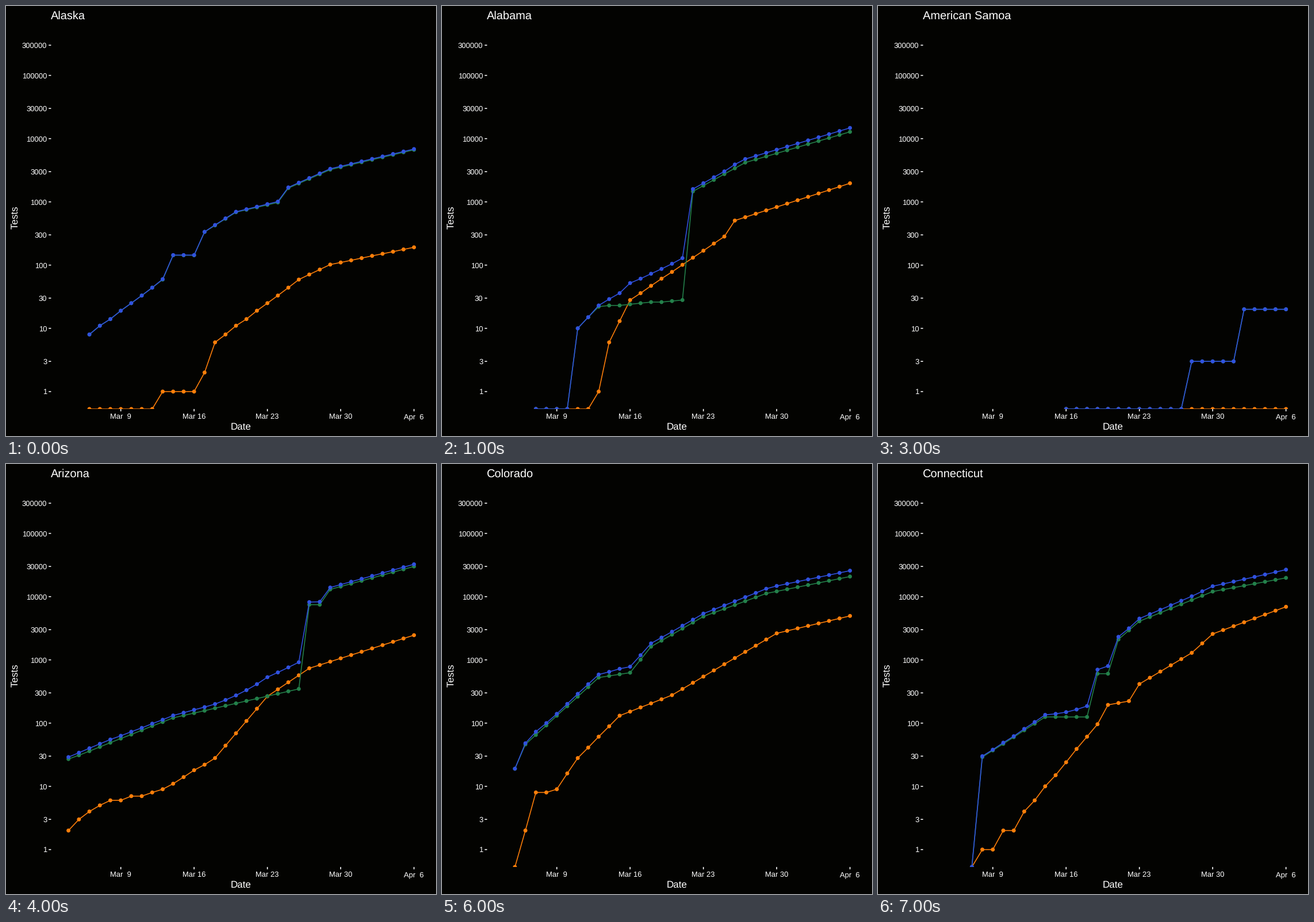
These frames come from a looping animation (748 px wide and 748 px high, 8 s). A matplotlib script:

```python
import numpy as np
import matplotlib.pyplot as plt
from matplotlib.animation import FuncAnimation
from matplotlib.patches import Rectangle

SIZE, DPI = 748, 100
PT = 72 / DPI                       # points per pixel
LEFT, RIGHT, TOP, BOTTOM = 78.4, 739.7, 35, 701
BLUE, GREEN, ORANGE = "#3051df", "#23804a", "#ff7f0a"

plt.rcParams.update({"font.family": "Liberation Sans",
                     "text.hinting": "none", "text.hinting_factor": 1})


def growth(knots):
    """Daily counts growing exponentially between {day of March: count} knots."""
    days = np.arange(min(knots), max(knots) + 1)
    logs = np.log10(np.maximum(list(knots.values()), 0.1))
    return days, np.round(10 ** np.interp(days, list(knots), logs))


states = []


def add(name, negative, positive):
    days, neg = growth(negative)
    _, pos = growth(positive)
    states.append((name, days, (pos, neg, neg + pos)))


add("Alaska",
    {6: 8, 13: 59, 14: 143, 16: 143, 17: 334, 20: 686, 24: 978, 25: 1649,
     29: 3232, 37: 6650},
    {6: 0, 12: 0, 13: 1, 16: 1, 18: 6, 26: 59, 29: 102, 37: 191})
add("Alabama",
    {7: 0, 10: 0, 11: 10, 13: 22, 21: 28, 22: 1464, 27: 4184, 37: 12797},
    {7: 0, 12: 0, 13: 1, 14: 6, 16: 28, 25: 283, 26: 506, 37: 1968})
add("Arkansas",
    {6: 6, 8: 6, 9: 12, 11: 12, 15: 103, 21: 567, 27: 1545, 28: 2938,
     30: 5260, 37: 11932},
    {6: 0, 11: 0, 12: 6, 19: 46, 20: 96, 26: 335, 37: 875})
add("American Samoa",
    {16: 0, 27: 0, 28: 3, 32: 3, 33: 20, 37: 20},
    {16: 0, 37: 0})
add("Arizona",
    {4: 27, 14: 121, 26: 347, 27: 7455, 28: 7455, 29: 13000, 37: 30000},
    {4: 2, 7: 5, 13: 9, 18: 28, 23: 265, 27: 736, 37: 2456})
add("California",
    {4: 462, 8: 462, 9: 690, 11: 916, 15: 916, 16: 7981, 34: 24599,
     35: 101674, 37: 103095},
    {4: 53, 16: 335, 19: 924, 29: 5708, 37: 14336})
add("Colorado",
    {5: 19, 6: 46, 13: 525, 16: 627, 18: 1617, 23: 4845, 29: 11215,
     37: 20775},
    {5: 0, 6: 2, 7: 8, 9: 9, 11: 28, 15: 131, 20: 277, 30: 2627, 37: 4950})
add("Connecticut",
    {7: 0, 8: 29, 14: 125, 18: 125, 19: 604, 20: 604, 21: 2106, 23: 4079,
     30: 12029, 37: 19800},
    {7: 0, 8: 1, 9: 1, 19: 96, 20: 194, 22: 223, 23: 415, 28: 1291,
     30: 2571, 37: 6906})


def x_of(day):
    return 199.7 + 18.214 * (day - 9)


def y_of(count):
    """Log scale; zero counts rest on the bottom edge of the panel."""
    count = np.asarray(count, float)
    y = 670.7 - 110 * np.log10(np.maximum(count, 0.1))
    return np.where(count > 0, y, BOTTOM)


fig = plt.figure(figsize=(SIZE / DPI, SIZE / DPI), dpi=DPI, facecolor="#030301")
ax = fig.add_axes([0, 0, 1, 1])
ax.set_xlim(0, SIZE)
ax.set_ylim(SIZE, 0)
ax.axis("off")


def label(x, y, text, px, ha="center", **kw):
    return ax.text(x, y, text, fontsize=px * PT, color="white", ha=ha,
                   va="baseline", **kw)


def tick(xs, ys):
    ax.plot(xs, ys, color="white", lw=1.6 * PT, solid_capstyle="butt",
            snap=False)


for power in range(6):
    for value in (10 ** power, 3 * 10 ** power):
        y = float(y_of(value))
        tick([LEFT - 4.1, LEFT], [y, y])
        label(71.4, y + 4.7, str(value), 13.2, ha="right")

for day in range(9, 38, 7):
    month, date = ("Mar", day) if day <= 31 else ("Apr", day - 31)
    tick([x_of(day)] * 2, [BOTTOM, BOTTOM + 4.1])
    label(x_of(day), 718.2, f"{month} {date:2d}", 13.2)

label(409, 736.6, "Date", 16.5)
label(20, 368, "Tests", 16.5, rotation=90, rotation_mode="anchor")
title = label(78, 22.5, "", 19.8, ha="left")

panel = Rectangle((LEFT, TOP), RIGHT - LEFT, BOTTOM - TOP,
                  transform=ax.transData)


def stroke(color, px):
    line, = ax.plot([], [], color=color, lw=px * PT, snap=False,
                    solid_capstyle="round", solid_joinstyle="round")
    line.set_clip_path(panel)
    return line


# Dots are tiny round-capped strokes, which keep their subpixel places.
series = [(stroke(c, 1.6), stroke(c, 7)) for c in (ORANGE, GREEN, BLUE)]


def draw(i):
    name, days, counts = states[i % len(states)]
    title.set_text(name)
    x = x_of(days)
    for (line, dots), count in zip(series, counts):
        y = y_of(count)
        line.set_data(x, y)
        dots.set_data(np.column_stack([x, x + 0.02, x * np.nan]).ravel(),
                      np.repeat(y, 3))
    return [title] + [artist for pair in series for artist in pair]


anim = FuncAnimation(fig, draw, frames=len(states), interval=1000,
                     repeat=True, repeat_delay=0, blit=False)
plt.show()
```
